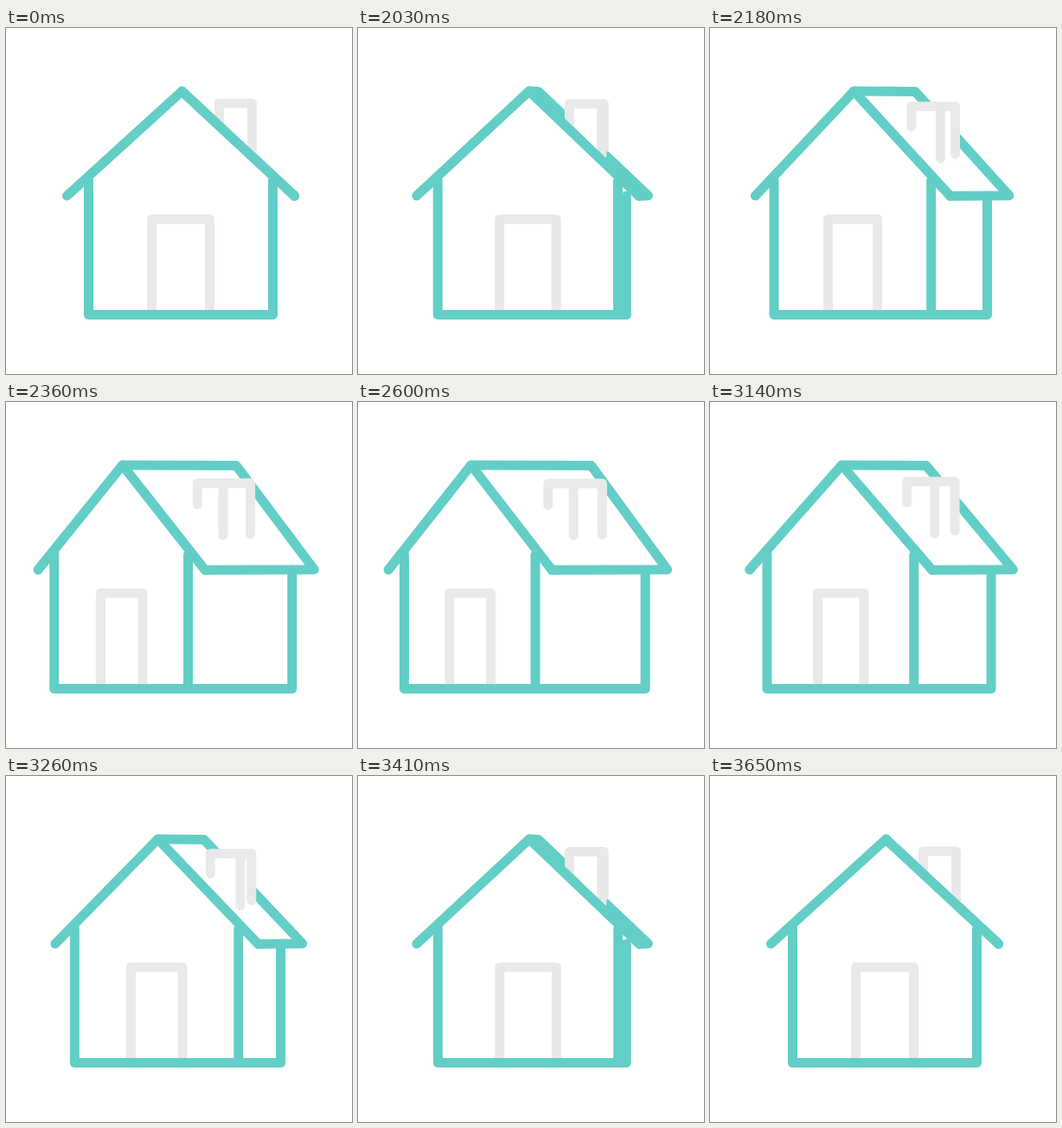
An HTML page for the animation above (5690 ms loop, 400 by 400 pixels).

```html
<!DOCTYPE html>
<html lang="en">
<head>
<meta charset="utf-8">
<title>Turning house</title>
<style>
  html, body { margin: 0; width: 100%; height: 100%; overflow: hidden; background: #fff; }
  svg { display: block; width: 100%; height: 100%; }
  path { fill: none; stroke: #63cec6; stroke-width: 11; stroke-linecap: round; stroke-linejoin: round; }
  .grey { stroke: #e9e9e9; }
  .mask { fill: #fff; stroke: none; }
</style>
</head>
<body>
<svg viewBox="0 0 400 400">
  <path id="door" class="grey"/>
  <path id="sideRoof"/>
  <path id="chimneyFill" class="mask"/>
  <path id="chimney" class="grey"/>
  <path id="walls"/>
  <path id="frontRoof"/>
</svg>
<script>
const LOOP = 5690, START = 2030, END = 3650, STEP = 30;

// Turn amount over time: [ms, value, slope per second]
const keys = [
  [2030, 0.08, 1.9],
  [2360, 0.97, 0.7],
  [2600, 1.025, 0],
  [2900, 1, -0.26],
  [3140, 0.72, -2.36],
  [3410, 0.077, -1],
  [3650, 0, 0]
];

function turnAt(ms) {
  if (ms < START || ms >= END) return 0;
  const t = START + Math.floor((ms - START) / STEP) * STEP;
  const i = keys.findIndex((k, n) => t >= k[0] && t < keys[n + 1][0]);
  const [t0, v0, s0] = keys[i], [t1, v1, s1] = keys[i + 1];
  const d = (t1 - t0) / 1000, u = (t - t0) / (t1 - t0), w = 1 - u;
  return v0 * w * w * (1 + 2 * u) + v1 * u * u * (3 - 2 * u)
       + d * (s0 * u * w * w - s1 * u * u * w);
}

const line = (...pts) => "M" + pts.map(p => p.join(" ")).join("L");
const set = (id, ...lines) =>
  document.getElementById(id).setAttribute("d", lines.join(""));

function draw(p) {
  const mix = (a, b) => +(a + (b - a) * p).toFixed(2);

  const apex = [mix(203.5, 132.5), 73];
  const farApex = [mix(203.5, 268), 73.5];
  const eaveLeft = [mix(70.5, 36), 194];
  const eaveRight = [mix(333.5, 227), 194.3];
  const eaveFar = [mix(333.5, 357), 193.7];
  set("frontRoof", line(eaveLeft, apex, eaveRight));
  set("sideRoof", line(apex, farApex, eaveFar, eaveRight));

  const left = mix(95.5, 54.5), corner = mix(308.5, 207.5), far = mix(308.5, 331.5);
  const floor = 331.5;
  set("walls",
    line([left, 176], [left, floor], [far, floor], [far, 194]),
    line([corner, 177], [corner, floor]));

  const doorL = mix(168.5, 107.5), doorR = mix(235.5, 155.5);
  set("door", line([doorL, 326], [doorL, 221], [doorR, 221], [doorR, 326]));

  const top = mix(87, 94);
  const cl = mix(246.5, 220.5), cm = mix(284.5, 250), cr = mix(284.5, 282.5);
  const clEnd = [cl, mix(108.3, 119)];
  const cmEnd = [cm, mix(147, 154)];
  const crEnd = [cr, mix(138, 153)];
  const outline = line(clEnd, [cl, top], [cr, top], crEnd);
  set("chimney", outline, line([cm, top], cmEnd));
  set("chimneyFill", outline + "L" + cmEnd.join(" ") + "Z");
}

let origin = null;
function tick(now) {
  if (origin === null) origin = now;
  draw(turnAt((now - origin) % LOOP));
  requestAnimationFrame(tick);
}
draw(0);
requestAnimationFrame(tick);
</script>
</body>
</html>
```
